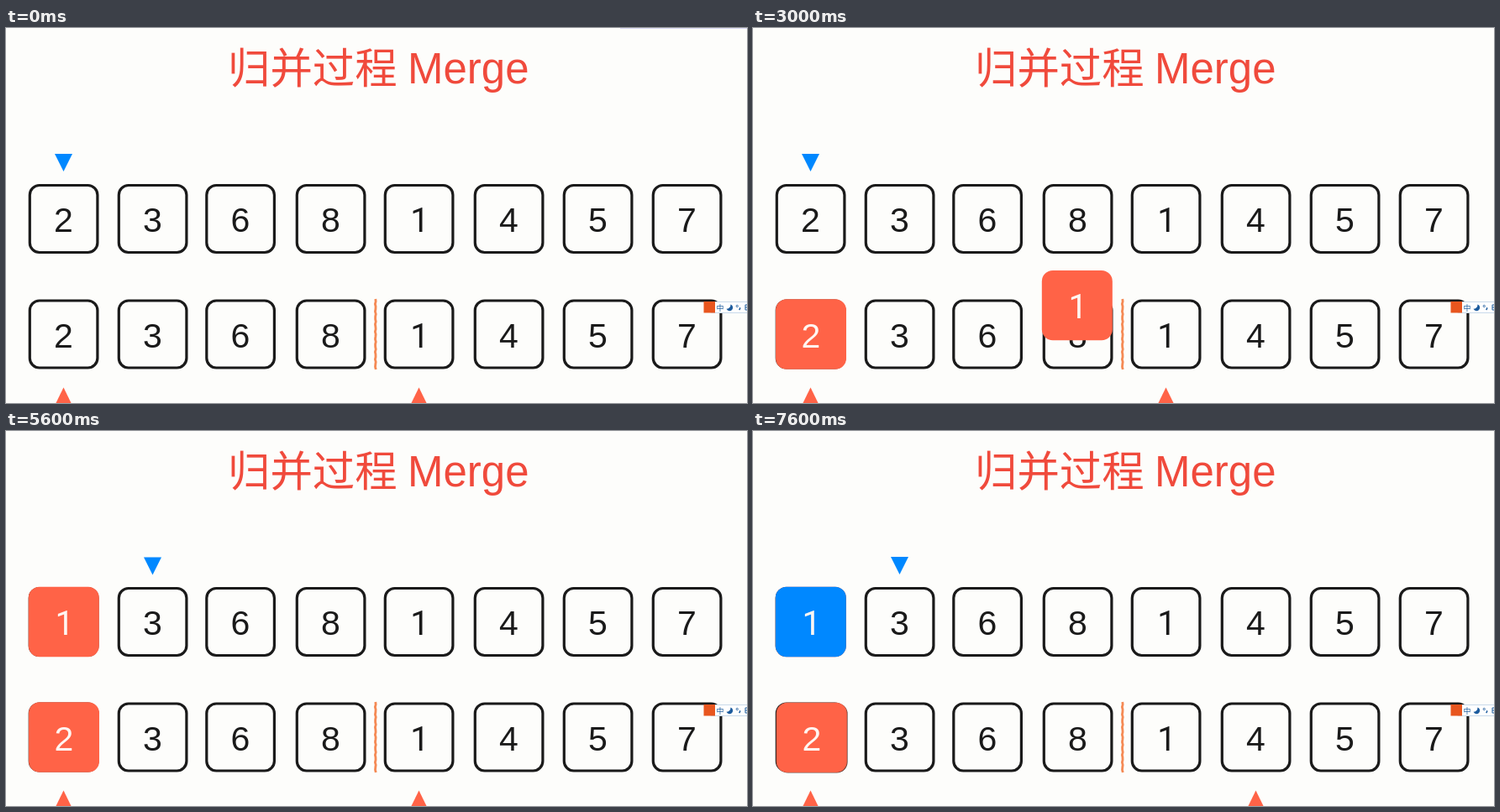
An HTML page that plays this animation: 882 px wide and 447 px high, repeating every 8 s.

```html
<!DOCTYPE html>
<html lang="zh">
<head>
<meta charset="utf-8">
<title>归并过程 Merge</title>
<style>
  html, body { margin: 0; width: 100%; height: 100%; overflow: hidden; background: #fdfdfb; }
  svg { display: block; width: 100%; height: 100%; }
  .digit { font: 41px "Liberation Sans", Arial, sans-serif; text-anchor: middle; }
  .one { font: 40px Roboto, sans-serif; text-anchor: middle; }
  .title { fill: #f04a3c; font: 51px "Liberation Sans", Arial, sans-serif; }
  .han { font: 50.4px "Noto Sans CJK SC", "Noto Sans CJK", sans-serif; }
  .ime { fill: #1d5c9e; font: 9px "Noto Sans CJK SC", "Noto Sans CJK", sans-serif; }
</style>
</head>
<body>
<svg viewBox="0 0 882 447" id="stage"></svg>
<script>
const LOOP = 8000, STEP = 100;
const INK = '#1a1a1a', RED = '#ff6347', BLUE = '#0088ff';
const COLS = [68.5, 174.5, 279, 386.5, 491.5, 598.5, 704.5, 810.5];
const VALUES = [2, 3, 6, 8, 1, 4, 5, 7];
const TOP = 227.5, BOTTOM = 365;
const stage = document.getElementById('stage');

function add(tag, attrs, parent = stage, text) {
  const el = document.createElementNS('http://www.w3.org/2000/svg', tag);
  for (const k in attrs) el.setAttribute(k, attrs[k]);
  if (text !== undefined) el.textContent = text;
  parent.appendChild(el);
  return el;
}

function digit(value, fill, parent) {
  const one = value === 1;
  add('text', { x: one ? 1 : 0, y: 15.5, fill, class: one ? 'one' : 'digit' }, parent, value);
}

function place(el, x, y) {
  el.setAttribute('transform', `translate(${x} ${y})`);
}

function box(value, x, y) {
  const g = add('g', {});
  add('rect', { x: -40.2, y: -40, width: 80.6, height: 80, rx: 11.5,
    fill: '#fdfdfb', stroke: INK, 'stroke-width': 3.2 }, g);
  digit(value, INK, g);
  place(g, x, y);
}

function tile(value) {
  const g = add('g', {});
  const shape = { x: -42, y: -41.7, width: 84, height: 83.4, rx: 13 };
  const edge = add('rect', { ...shape, fill: '#5a3a34', transform: 'translate(.8 .5)' }, g);
  add('rect', { ...shape, fill: RED }, g);
  const cover = add('rect', { ...shape, fill: BLUE, opacity: 0 }, g);
  digit(value, '#fff6f2', g);
  return { g, edge, cover };
}

function show(el, alpha) {
  el.setAttribute('opacity', alpha);
}

// Static scene
const topLine = add('rect', { x: 731, y: 0, width: 151, height: 1, fill: '#dadaf4' });
const title = add('text', { y: 65.5, class: 'title' });
add('tspan', { x: 264, class: 'han' }, title, '归并过程');
add('tspan', { x: 478 }, title, 'Merge');
COLS.forEach((x, i) => { box(VALUES[i], x, TOP); box(VALUES[i], x, BOTTOM); });

// Crayon-like divider
let brush = 'M439.8 323';
for (let i = 1; i <= 28; i++) brush += `L${(439.8 + 0.45 * Math.sin(i * 2.3)).toFixed(2)} ${323 + i * 3}`;
add('path', { d: brush, fill: 'none', stroke: '#f58a55', 'stroke-width': 2.8 });

// Input bar
add('rect', { x: 838, y: 326.5, width: 50, height: 13, rx: 2, fill: '#fff', stroke: '#c9d9ea' });
add('rect', { x: 830.5, y: 326, width: 13.5, height: 13.5, fill: '#e8561f' });
add('text', { x: 845.5, y: 336.5, class: 'ime' }, stage, '中');
add('path', { d: 'M862.5 329.5A4 4 0 1 1 857.5 334.8A5 5 0 0 0 862.5 329.5', fill: '#1d5c9e' });
add('circle', { cx: 870.3, cy: 331.5, r: 1.1, fill: 'none', stroke: '#1d5c9e', 'stroke-width': .9 });
add('path', { d: 'M873.6 333.2v1.6l-1 1.2', fill: 'none', stroke: '#1d5c9e', 'stroke-width': 1.5 });
add('path', { d: 'M884 330h-4v6h4M880 333h4', fill: 'none', stroke: '#1d5c9e' });

// Moving parts
const two = tile(2), one = tile(1);
const target = add('path', { d: 'M-10.5 150h21L0 171z', fill: BLUE });
const left = add('path', { d: 'M0 428.5L10.5 450h-21z', fill: RED });
const right = add('path', { d: 'M0 428.5L10.5 450h-21z', fill: RED });
place(left, COLS[0], 0);

const ramp = (t, start, span = 300) => Math.min(1, Math.max(0, (t - start) / span));
const ease = p => (1 - Math.cos(Math.PI * p)) / 2;
const mix = (a, b, p) => a + (b - a) * p;

function draw(ms) {
  const t = Math.floor((ms % LOOP) / STEP) * STEP;
  const lit = ramp(t, 2000);
  const rise = ease(ramp(t, 2900));
  const settled = ramp(t, 6200);

  show(topLine, t < 1900 ? 1 : 0);
  show(two.g, lit);
  show(one.g, lit);
  show(two.edge, settled);
  show(one.edge, rise > 0 ? 0 : 1);
  show(one.cover, settled);

  place(two.g, COLS[0] + 0.5 + 0.8 * settled, BOTTOM + 0.4 * settled);
  place(one.g, mix(COLS[4], COLS[0] + 0.3, rise), mix(BOTTOM, TOP, rise));
  place(target, mix(COLS[0], COLS[1], ease(ramp(t, 3700))), t >= 4000 && t < 6000 ? 0.6 : 0);
  place(right, mix(COLS[4], COLS[5], ease(ramp(t, 5900))), 0);
}

function frame() {
  draw(performance.now() - begin);
  requestAnimationFrame(frame);
}

const begin = performance.now();
frame();
</script>
</body>
</html>
```
